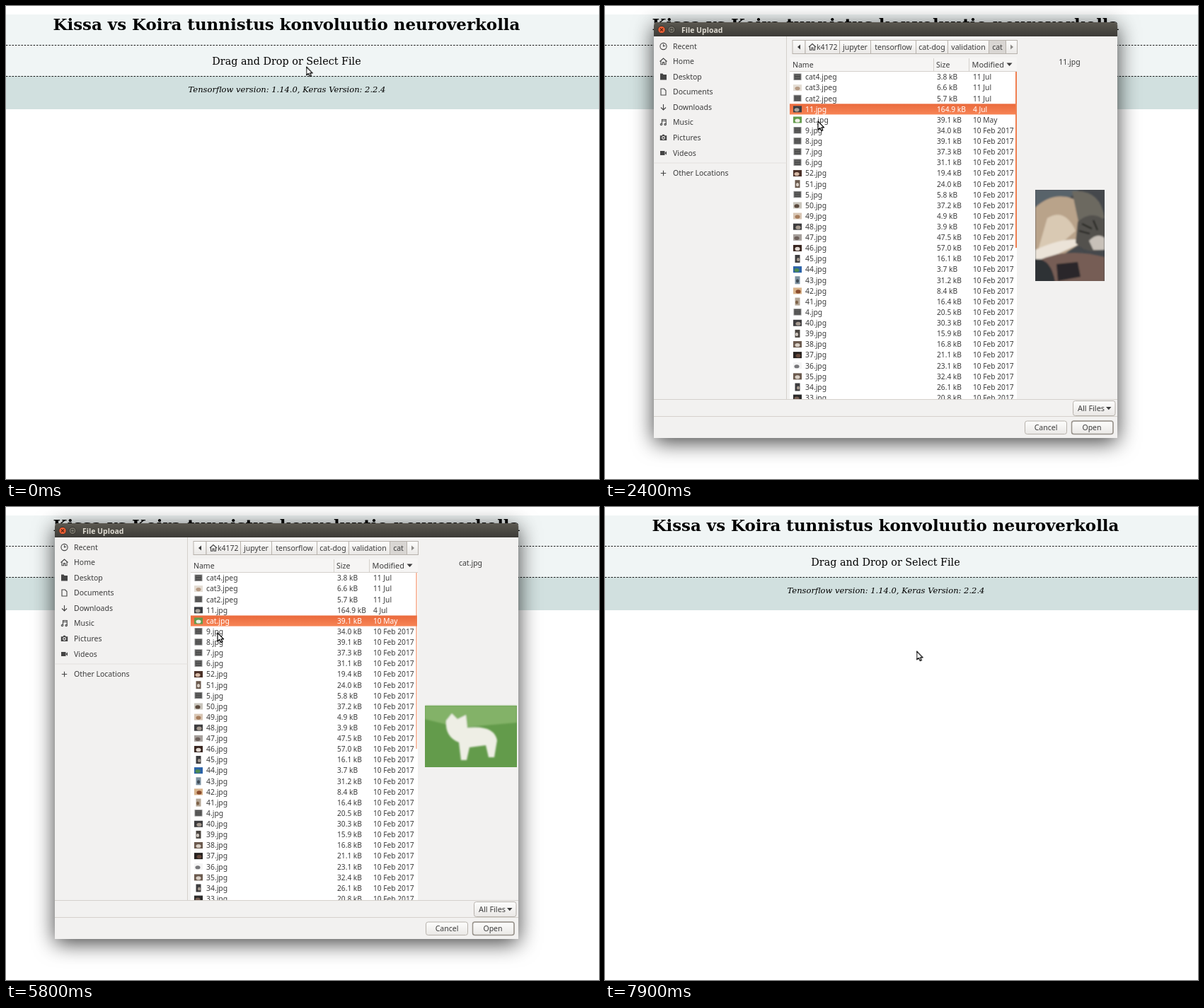
Animation, 838 px wide and 669 px high, one loop 8 s. Source, as an HTML page:

```html
<!DOCTYPE html>
<html lang="fi">
<head>
<meta charset="utf-8">
<title>Kissa vs Koira</title>
<style>
  html, body { margin: 0; width: 100%; height: 100%; overflow: hidden; background: #fff; }
  svg { display: block; width: 100%; height: 100%; }
  text { white-space: pre; }
  .page { font-family: "DejaVu Serif", serif; text-anchor: middle; }
  .ui { font: 10.5px "Noto Sans", "Open Sans", sans-serif; fill: #3c3c3c; }
  .num { font-size: 10.2px; }
  .mid { text-anchor: middle; }
  .lit { fill: #fff; }
  .icon { fill: none; stroke: #444; stroke-width: 1.1; }
  .icon .solid { fill: #444; stroke: none; }
  .edge { fill: none; stroke: #d5d1cc; }
  .btn { fill: url(#face); stroke: #b7b2ac; }
  #frame { filter: drop-shadow(0 6px 15px rgba(0, 0, 0, .75)); }
</style>
</head>
<body>
<svg viewBox="0 0 838 669">
  <defs>
    <linearGradient id="bar" x2="0" y2="1"><stop stop-color="#5b5850"/><stop offset="1" stop-color="#3d3b37"/></linearGradient>
    <linearGradient id="face" x2="0" y2="1"><stop stop-color="#fdfdfc"/><stop offset="1" stop-color="#eae8e6"/></linearGradient>
    <linearGradient id="pick" x2="0" y2="1"><stop stop-color="#ea6a3c"/><stop offset="1" stop-color="#f78455"/></linearGradient>
    <linearGradient id="curtain"><stop stop-color="#4e4c4a"/><stop offset=".3" stop-color="#8d8b89"/><stop offset=".6" stop-color="#d6d5d2"/><stop offset="1" stop-color="#a09e9b"/></linearGradient>
    <filter id="soft"><feGaussianBlur stdDeviation="1.1"/></filter>
    <clipPath id="ghostArea"><path d="M69 43H717V611H69Z"/></clipPath>
    <clipPath id="stripArea"><path d="M717 43H724V611H717Z"/></clipPath>
    <clipPath id="listArea"><path d="M261 93H582V556H261Z"/></clipPath>
    <clipPath id="tall"><path d="M608.5 260H705.5V389H608.5Z"/></clipPath>
    <clipPath id="wide"><path d="M592 276.5H721.5V373.5H592Z"/></clipPath>
    <clipPath id="strip"><path d="M592 298H721.5V352H592Z"/></clipPath>
  </defs>

  <g id="page" class="page">
    <path d="M0 0H838V669H0Z" fill="#fff"/>
    <path d="M0 12H838V99H0Z" fill="#f0f5f5"/>
    <path d="M0 99H838V146H0Z" fill="#d1e0df"/>
    <path d="M0 55.5H838M0 99.5H838" stroke="#111" stroke-dasharray="2.4 1.9"/>
    <text x="396.5" y="33.5" font-size="22.93" font-weight="bold">Kissa vs Koira tunnistus konvoluutio neuroverkolla</text>
    <text x="396.5" y="82.5" font-size="14.35">Drag and Drop or Select File</text>
    <text x="397" y="122.3" font-size="11.5" font-style="italic">Tensorflow version: 1.14.0, Keras Version: 2.2.4</text>
  </g>

  <g id="win" class="ui">
    <path id="frame" d="M69 611V28Q69 23 74 23H719Q724 23 724 28V611Z" fill="#f2f1f0"/>
    <g id="ghost">
      <g clip-path="url(#ghostArea)"><use href="#page" y="20"/></g>
      <g clip-path="url(#stripArea)"><use href="#page" y="2"/></g>
    </g>
    <path d="M69 43V28Q69 23 74 23H719Q724 23 724 28V43Z" fill="url(#bar)"/>
    <circle cx="80" cy="33.5" r="5.2" fill="#ee5f34" stroke="#35332f"/>
    <path d="M78 31.5l4 4m0-4l-4 4" stroke="#5a2413" stroke-width="1.1"/>
    <circle cx="94" cy="33.5" r="5" fill="#77746a" stroke="#35332f"/>
    <path d="M92 31.5h4v4h-4z" fill="none" stroke="#3b3934"/>
    <text x="108" y="37.5" font-size="10.5" font-weight="bold" fill="#dfdbd2">File Upload</text>

    <g id="body">
      <path class="edge" d="M256.5 43V556M69 556.5H724M69 580.5H724"/>
      <path class="edge" d="M70 222H256" stroke-dasharray="1 1"/>
      <g id="places"></g>
      <g id="path"></g>
      <g id="buttons"></g>
      <g id="files">
        <path d="M261 73H582V556H261Z" fill="#fff"/>
        <path d="M261 73H582V93H261Z" fill="#f6f5f4"/>
        <path class="edge" d="M261 92.5H582"/>
        <text x="265" y="86.5">Name</text>
        <g class="cols">
          <path class="edge" d="M463.5 74V93M513.5 74V93"/>
          <text x="467" y="86.5">Size</text><text x="517.5" y="86.5" font-size="10.9">Modified</text>
          <path d="M566.5 80.5h8l-4 4.5z"/>
        </g>
        <g clip-path="url(#listArea)">
          <g id="rows"></g><g id="picked"></g><g id="thumbs"></g>
          <g class="cols"><path id="scroll" d="M579 93H581V342H579Z" fill="#f07f50"/></g>
        </g>
        <g id="previews">
          <g data-name="cat4.jpeg" clip-path="url(#strip)">
            <path d="M592 298h130v54H592z" fill="#fefefe"/>
            <g filter="url(#soft)">
              <path d="M640 349L670 340L694 347L688 352H650Z" fill="#dcc9ae"/>
              <path d="M652 296H673V343H652Z" fill="#c8c1b6"/><path d="M664 296H673V343H664Z" fill="#b5ada2"/>
            </g>
            <path d="M640 346C622 355 624 334 615 326" fill="none" stroke="#2d2623" stroke-width="3.4" stroke-linecap="round"/>
            <path d="M638 320Q627 340 631 350Q645 353 652 349Q655 335 650 320Z" fill="#75665e"/>
            <path d="M638 308L641 311H647L651 308L652 318Q646 325 639 318Z" fill="#2b2422"/>
            <path d="M648 325L657 318V309M650 331L658 325V313M648 338V350" fill="none" stroke="#302825" stroke-width="3" stroke-linecap="round"/>
          </g>
          <g data-name="11.jpg" clip-path="url(#tall)">
            <path d="M608 260h98v130h-98z" fill="#45484c"/>
            <g filter="url(#soft)">
              <path d="M608 260H670L640 285L608 300Z" fill="#59636a"/>
              <path d="M608 285Q640 255 680 282L690 325L650 350L608 355Z" fill="#b9a38a"/>
              <path d="M625 300Q650 285 665 318L640 340L612 345Z" fill="#d9c9b3"/>
              <path d="M660 262Q700 258 706 300L670 310Z" fill="#6c6961"/>
              <path d="M608 345Q640 330 665 330L668 338L630 355L608 360Z" fill="#ebe3d8"/>
              <path d="M668 305Q688 288 706 303V345Q680 352 665 335Z" fill="#53514d"/>
              <path d="M684 332Q696 320 706 328V345H690Z" fill="#c8c1b9"/>
              <path d="M670 318l15 4M674 308l14 7M690 303l6 14" stroke="#24241f" stroke-width="2"/>
              <path d="M608 362Q650 340 706 355V390H608Z" fill="#765d55"/>
              <path d="M608 358Q630 356 636 390H608Z" fill="#2e3036"/>
              <path d="M638 365L668 362L672 383L640 389Z" fill="#292729"/>
            </g>
          </g>
          <g data-name="9.jpg" clip-path="url(#tall)">
            <path d="M608 260h98v130h-98z" fill="#a4afbf"/>
            <g filter="url(#soft)">
              <path d="M686 260H706V300L690 290Z" fill="#7c5449"/>
              <path d="M670 290L706 300V390H660Z" fill="#b8b5bb"/>
              <path d="M608 372L650 350L706 372V390H608Z" fill="#b38270"/>
              <path d="M612 310Q620 288 645 290L682 295Q700 335 690 372L650 380Q608 365 612 310Z" fill="#e3e4e9"/>
              <path d="M672 300Q700 310 703 350L688 355Q678 330 662 318Z" fill="#b06f48"/>
              <path d="M608 352Q640 345 664 360L660 380L608 372Z" fill="#8f4e30"/>
              <path d="M634 258L645 264H670L688 258L687 285Q660 312 637 285Z" fill="#c27e50"/>
              <path d="M657 262H664L672 293Q660 306 646 291Z" fill="#f1eded"/>
              <ellipse cx="627" cy="378" rx="16" ry="9" fill="#eeeef2"/><ellipse cx="676" cy="363" rx="11" ry="20" fill="#f0f0f3"/>
            </g>
            <g fill="#454b39"><circle cx="645" cy="274" r="3.2"/><circle cx="668" cy="278" r="3.2"/></g>
            <path d="M653 286h6l-3 3z" fill="#c87b74"/>
          </g>
          <g data-name="cat.jpg" clip-path="url(#wide)">
            <path d="M592 281h130v87H592z" fill="#639b4b"/>
            <g filter="url(#soft)">
              <path d="M592 281H722V305L640 312L592 300Z" fill="#83b268"/>
              <path d="M622 302L630 292L638 300L650 294L652 312Q690 308 694 330L690 354H682L678 337L655 340L651 358H643L640 333Q620 325 622 302Z" fill="#eeeee5"/>
            </g>
          </g>
          <g data-name="8.jpg" clip-path="url(#wide)">
            <path d="M592 276h130v98H592z" fill="url(#curtain)"/>
            <g filter="url(#soft)">
              <path d="M640 276V320M668 276V300M690 276V340M705 276V350" stroke="#f0efec" stroke-width="4"/>
              <ellipse cx="680" cy="362" rx="45" ry="18" fill="#e5e2dd"/>
              <path d="M657 294L666 301H674L683 295L684 318Q710 325 706 355Q680 372 655 360Z" fill="#171617"/>
              <path d="M592 335Q610 322 635 328L660 345L662 372H592Z" fill="#64605b"/>
              <path d="M622 302L632 309H646L657 303L658 325Q642 342 624 326Z" fill="#837d75"/>
              <path d="M634 310v8M640 309v9M646 310v8M605 338l14 22M620 335l10 25M634 350l18 5M640 362l20-2" stroke="#383532" stroke-width="2"/>
              <ellipse cx="642" cy="328" rx="6" ry="4" fill="#b8b1a8"/>
            </g>
            <path d="M631 321h4m10 0h4m15-10h3m8 0h3" stroke="#b9b97e" stroke-width="2"/>
          </g>
        </g>
      </g>
    </g>
  </g>

  <path id="cursor" d="M0 0V12L2.8 9.5L4.8 13.6L6.8 12.7L5 8.8H8.6Z" fill="#fff" stroke="#000" stroke-width="1.2" stroke-linejoin="round"/>
</svg>

<script>
const LOOP = 8000;
const $ = id => document.getElementById(id);
const fill = (id, items, draw) => $(id).innerHTML = items.map(draw).join('');

// Hard-step animation; every track must start at 0 ms.
const play = (el, track) => el.animate(
  track.map(([ms, style]) => ({ offset: ms / LOOP, easing: 'step-end', ...style })),
  { duration: LOOP, iterations: Infinity });
const fade = (el, ...keys) => play(el, keys.map(([ms, opacity]) => [ms, { opacity }]));
const during = (el, ...spans) =>
  fade(el, ...(spans[0][0] ? [[0, 0]] : []), ...spans.flatMap(([from, to]) => to < LOOP ? [[from, 1], [to, 0]] : [[from, 1]]));

// Sidebar
const places = [
  ['Recent', 57, '<circle r="4.6"/><path d="M0-3V0L2.6-1"/>'],
  ['Home', 78.5, '<path d="M-5 0L0-4.5L5 0M-3.5-1V4.3H-1V1H1V4.3H3.5V-1"/>'],
  ['Desktop', 100, '<path class="solid" d="M-4.5-4.5H-1L0-3H4.5V4.5H-4.5Z"/>'],
  ['Documents', 121.5, '<path d="M-3.5-4.5H1L3.5-2V4.5H-3.5Z"/>'],
  ['Downloads', 143, '<path d="M0-4V4M-3.5 .5L0 4L3.5 .5"/>'],
  ['Music', 164.5, '<path d="M-2 3V-4H3.7V3M-2-2H3.7"/><circle cx="-3" cy="3" r="1.2"/><circle cx="2.6" cy="3" r="1.2"/>'],
  ['Pictures', 186, '<path class="solid" d="M-4.7-2.7H-2L-1-4.2H1L2-2.7H4.7V4H-4.7Z"/><circle r="1.9" cy=".5" stroke="#f2f1f0"/>'],
  ['Videos', 208, '<path class="solid" d="M-4.5-3H2V3H-4.5ZM2 0L4.5-2.7V2.7Z"/>'],
  ['Other Locations', 236.5, '<path d="M-3.7 0H3.7M0-3.7V3.7"/>']
];
fill('places', places, ([name, y, art]) =>
  `<g class="icon" transform="translate(82.5 ${y})">${art}</g><text x="96" y="${y + 3.8}">${name}</text>`);

// Path bar
const crumbs = [['', 265], ['k4172', 283], ['jupyter', 331.5], ['tensorflow', 375.5], ['cat-dog', 439.5], ['validation', 484.5], ['cat', 542.5], ['', 566.5]];
fill('path', crumbs, ([name, x], i) => {
  const end = i < 7 ? crumbs[i + 1][1] : 582.5;
  const mid = (x + end) / 2 + (i === 1 ? 6.5 : 0);
  return `<rect class="btn" x="${x}" y="48.5" width="${end - x}" height="19" ${i === 6 ? 'style="fill:#d9d6d3"' : ''}/>
    <text class="mid" x="${mid}" y="61.5">${name}</text>`;
});
$('path').innerHTML += `<path d="M276 54.5v7l-4-3.5z"/><path d="M573 54.5v7l4-3.5z" fill="#8d8b88"/>
  <g class="icon" transform="translate(293 58)">${places[1][2]}</g>`;

// Bottom buttons
const buttons = [['All Files', 661.5, 558.5, 59.5, 21, 687, 10.9], ['Cancel', 593.5, 587, 59, 18.5, 623, 10.5], ['Open', 659.5, 587, 58.5, 18.5, 688, 10.5]];
fill('buttons', buttons, ([name, x, y, w, h, mid, size]) =>
  `<rect class="btn" x="${x}" y="${y}" width="${w}" height="${h}" rx="3"/>
   <text class="mid" x="${mid}" y="${y + h / 2 + 3.8}" font-size="${size}">${name}</text>`);
$('buttons').innerHTML += `<path d="M708 567h7.5l-3.7 4.2z"/>
  <rect x="659.5" y="587" width="58.5" height="18.5" rx="3" fill="none" stroke="#98938c" stroke-width="1.5"/>`;

// File list
const PITCH = 15.12;
const files = `cat4.jpeg 3.8|cat3.jpeg 6.6|cat2.jpeg 5.7|11.jpg 164.9|cat.jpg 39.1|9.jpg 34.0|8.jpg 39.1|7.jpg 37.3|6.jpg 31.1|52.jpg 19.4|51.jpg 24.0|5.jpg 5.8|50.jpg 37.2|49.jpg 4.9|48.jpg 3.9|47.jpg 47.5|46.jpg 57.0|45.jpg 16.1|44.jpg 3.7|43.jpg 31.2|42.jpg 8.4|41.jpg 16.4|4.jpg 20.5|40.jpg 30.3|39.jpg 15.9|38.jpg 16.8|37.jpg 21.1|36.jpg 23.1|35.jpg 32.4|34.jpg 26.1|33.jpg 20.8`
  .split('|').map((entry, i) => {
    const [name, size] = entry.split(' ');
    const date = i < 3 ? '11 Jul' : i === 3 ? '4 Jul' : i === 4 ? '10 May' : '10 Feb 2017';
    return { name, size, date, y: 93 + i * PITCH };
  });
const rowText = ({ name, size, date, y }) => `<text x="283" y="${y + 11.3}" font-size="10.4">${name}</text>
  <g class="cols num"><text x="468" y="${y + 11.3}">${size} kB</text><text x="519" y="${y + 11.3}">${date}</text></g>`;
fill('rows', files, rowText);

const tones = {
  cat3: ['#e4ddd4', '#b59a84'], 11: ['#3b3d42', '#a9a39b'], cat: ['#639b4b', '#f0f0e8'], 52: ['#4a3027', '#d6b9a5'],
  50: ['#c9c5bc', '#5b4a3e'], 49: ['#d8c6b4', '#a67c5b'], 47: ['#a6a09c', '#6d605b'], 46: ['#38251f', '#e2d9d2'],
  44: ['#2b62a8', '#4d8b52'], 43: ['#7e92a1', '#3f4b55'], 42: ['#d9b48c', '#8a4c2c'], 41: ['#b3a595', '#7c6148'],
  36: ['#f4f4f4', '#77777a'], 37: ['#26211f', '#65483b'], 33: ['#2b2b2b', '#765f54']
};
const plain = ['cat4', 'cat2', '9', '8', '7', '6', '5', '4'];
const narrow = ['51', '45', '43', '41', '39', '34'];
fill('thumbs', files, ({ name, y }, i) => {
  const key = name.split('.')[0];
  if (plain.includes(key)) return `<rect x="267" y="${y + 3}" width="10" height="8.4" fill="#4b4b4b" stroke="#8d8d8d"/>
    <path d="M268.5 ${y + 5.5}h7m-7 3h7" stroke="#70706e"/>`;
  const [back, front] = tones[key] || [['#4a443f', '#cfc8c0'], ['#6b5a4e', '#d8cfc5'], ['#3d3c3e', '#a59a90']][i % 3];
  const w = narrow.includes(key) ? 7 : 12, h = w === 7 ? 11 : 9;
  return `<rect x="${272 - w / 2}" y="${y + 7.5 - h / 2}" width="${w}" height="${h}" fill="${back}"/>
    <ellipse cx="${271 + i % 3}" cy="${y + 8.5}" rx="${w / 3.4}" ry="2.6" fill="${front}"/>`;
});

// Selection and preview, by file name: [from, to] in ms
const picks = {
  'cat4.jpeg': [0, 1700], '11.jpg': [1700, 5300], '9.jpg': [3400, 4600], 'cat.jpg': [5300, LOOP], '8.jpg': [6100, LOOP]
};
const shown = {
  'cat4.jpeg': [[0, 1700]], '11.jpg': [[1700, 3500], [4600, 5300]], '9.jpg': [[3500, 4600]], 'cat.jpg': [[5300, 6100]], '8.jpg': [[6100, LOOP]]
};
const picked = files.filter(file => picks[file.name]);
fill('picked', picked, file =>
  `<g class="lit"><rect x="261" y="${file.y}" width="320" height="${PITCH}" fill="url(#pick)"/>${rowText(file)}</g>`);
picked.forEach((file, i) => during($('picked').children[i], picks[file.name]));
for (const art of [...$('previews').children]) {
  const { name } = art.dataset;
  art.insertAdjacentHTML('afterend', `<text class="mid" x="656.5" y="82.5">${name}</text>`);
  during(art, ...shown[name]);
  during(art.nextElementSibling, ...shown[name]);
}

document.querySelectorAll('.cols').forEach(el => play(el, [
  [0, { transform: 'translate(0px)' }], [1700, { transform: 'translate(1px)' }], [5300, { transform: 'translate(0px)' }]]));
fade($('scroll'), [0, 1], [2900, 0], [3100, .5], [3200, 1], [5700, 0], [5800, .5], [5900, 1]);

// Window opening and closing
fade($('win'), [0, 0], [700, 1], [7000, .75], [7100, .5], [7200, .25], [7300, 0]);
during($('ghost'), [700, 800]);
during($('body'), [800, LOOP]);
during($('files'), [900, LOOP]);

const moves = [
  [0, 424.5, 86], [300, 421, 80], [400, 420.5, 84], [1300, 395, 100], [1400, 350, 125], [1500, 310, 140],
  [1600, 299, 143], [1900, 300, 152], [2000, 301, 162], [2400, 301, 163], [2900, 299, 165], [3100, 298.5, 171],
  [3200, 299, 176], [4400, 292.5, 146], [4700, 292, 157], [4900, 291.5, 164], [5000, 292, 157], [5300, 293, 157],
  [5500, 298, 160], [5700, 299, 170], [5800, 299, 178], [5900, 299, 186], [6200, 450, 320], [6300, 660, 557],
  [6500, 676, 572], [6600, 692, 588], [6700, 696.5, 594], [7000, 690, 585], [7100, 620, 480], [7200, 520, 320],
  [7300, 442.5, 205], [7500, 436, 204], [7800, 439, 204], [7900, 440.5, 204]
];
play($('cursor'), moves.map(([ms, x, y]) => [ms, { transform: `translate(${x}px, ${y}px)` }]));
</script>
</body>
</html>
```
